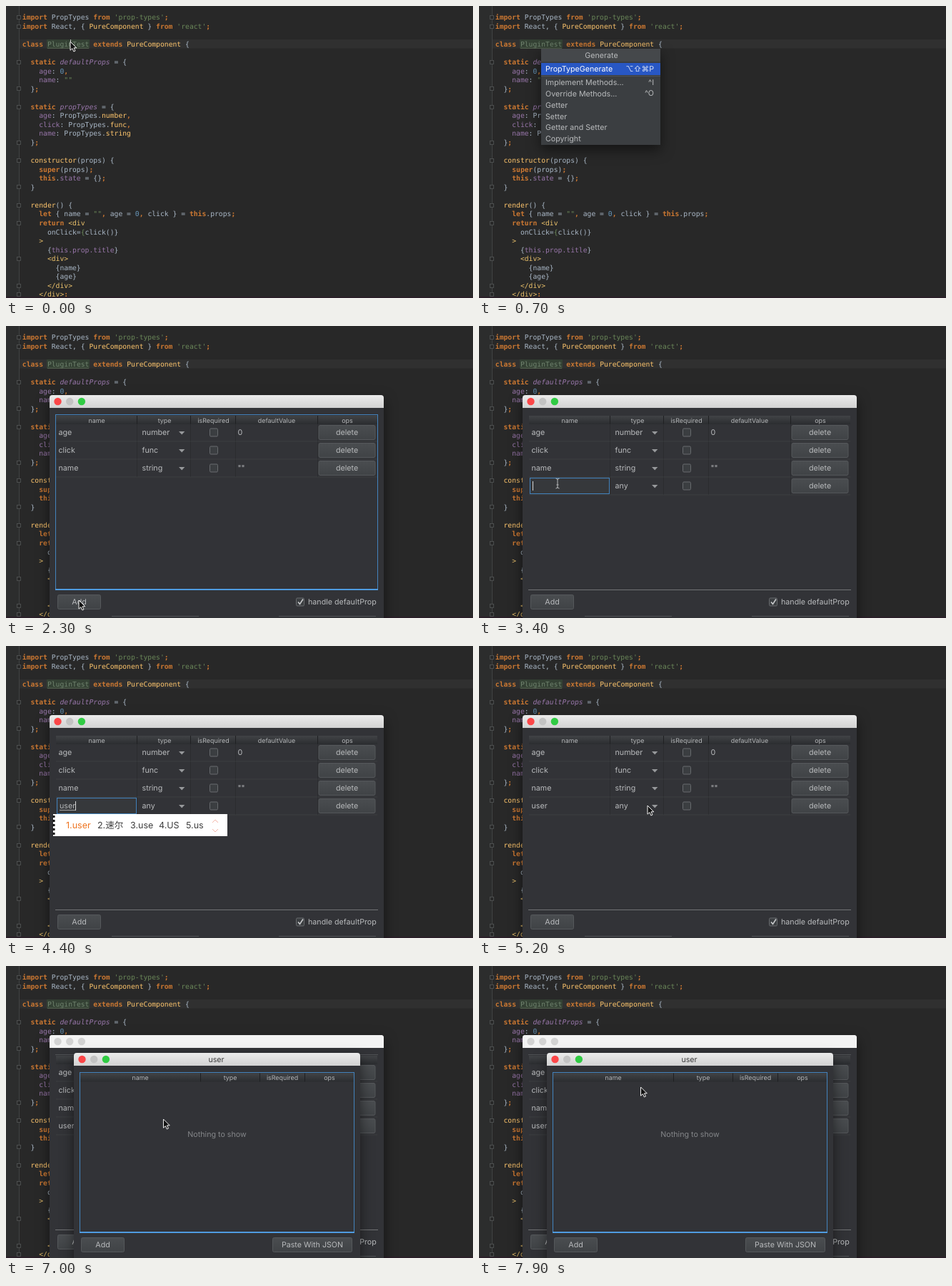
Write an HTML page that moves like this. It is 654 px wide and 410 px high and loops after 8000 ms.

```html
<!DOCTYPE html>
<html lang="en">
<head>
<meta charset="utf-8">
<title>Prop type generator</title>
<style>
html, body { margin: 0; width: 654px; height: 410px; overflow: hidden; background: #282828; }
svg { display: block; text-rendering: geometricPrecision; }
text { white-space: pre; font: 10.7px Inter, "Noto Sans CJK SC", "Noto Sans CJK", sans-serif; }
.code { font: 9.73px "DejaVu Sans Mono", monospace; }
.head { font-size: 8.9px; }
.ime { font-size: 12.5px; }
.window { filter: drop-shadow(0 7px 9px rgba(0, 0, 0, .5)); }
</style>
</head>
<body>
<svg id="stage" width="654" height="410" viewBox="0 0 654 410">
  <defs>
    <linearGradient id="bar" x2="0" y2="1"><stop stop-color="#ebebeb"/><stop offset="1" stop-color="#d2d2d2"/></linearGradient>
    <linearGradient id="headFill" x2="0" y2="1"><stop stop-color="#414346"/><stop offset="1" stop-color="#2b2d30"/></linearGradient>
    <linearGradient id="button" x2="0" y2="1"><stop stop-color="#4a4d50"/><stop offset="1" stop-color="#404346"/></linearGradient>
  </defs>
</svg>
<script>
const LOOP = 8000, STEP = 100;
const stage = document.getElementById('stage');
const BLUE = '#4383bd', INK = '#b9bbbd', BODY = '#323337';

function add(parent, tag, attrs = {}, content) {
  const el = document.createElementNS('http://www.w3.org/2000/svg', tag);
  for (const key in attrs) el.setAttribute(key, attrs[key]);
  if (content !== undefined) el.textContent = content;
  return parent.appendChild(el);
}
const group = (parent, attrs) => add(parent, 'g', attrs);
const box = (parent, x, y, width, height, fill, more) =>
  add(parent, 'rect', { x, y, width, height, fill, ...more });
const frame = (parent, x, y, w, h, stroke, more) =>
  box(parent, x + .5, y + .5, w - 1, h - 1, 'none', { stroke, ...more });
const path = (parent, d, more) => add(parent, 'path', { d, fill: 'none', ...more });
// y is the middle of the text line
const label = (parent, x, y, content, fill = INK, more) =>
  add(parent, 'text', { x, y: y + 3.8, fill, ...more }, content);
const centred = (parent, x, y, content, fill, more) =>
  label(parent, x, y, content, fill, { 'text-anchor': 'middle', ...more });

// Editor: [c...] marks a coloured run, c being a key of COLOURS
const COLOURS = { o: '#cc7832', y: '#ffc66d', p: '#9876aa', i: '#9876aa', g: '#6a8759', n: '#6897bb', c: '#71856f', t: '#e8bf6a' };
const CODE = `[oimport] PropTypes [ofrom] [g'prop-types'][o;]
[oimport] React, { [yPureComponent] } [ofrom] [g'react'][o;]

[oclass] [cPluginTest] [oextends] [yPureComponent] {

  [ostatic] [idefaultProps] = {
    [page]: [n0][o,]
    [pname]: [g""]
  }[o;]

  [ostatic] [ipropTypes] = {
    [page]: PropTypes.[ynumber][o,]
    [pclick]: PropTypes.[yfunc][o,]
    [pname]: PropTypes.[ystring]
  }[o;]

  [yconstructor](props) {
    [osuper](props)[o;]
    [othis].[pstate] = {}[o;]
  }

  [yrender]() {
    [olet] { name = [g""][o,] age = [n0][o,] click } = [othis].props[o;]
    [oreturn] [t<div]
      onClick=[g{]click()}
    [t>]
      {[pthis.prop.title]}
      [t<div>]
        {name}
        {age}
      [t</div>]
    [t</div>][o;]`;

function drawEditor() {
  box(stage, 0, 0, 654, 410, '#282828');
  box(stage, 0, 0, 18, 410, '#2c2d2d');
  box(stage, 18, 47, 636, 12.5, '#303030');
  box(stage, 57, 47, 60, 12.5, '#344134');
  path(stage, 'M18.5 0V410', { stroke: '#414343' });
  CODE.split('\n').forEach((line, row) => {
    const y = 16 + row * 12.55;
    const text = add(stage, 'text', { class: 'code', x: 22.8, y: y + 3.3, fill: '#a9b7c6' });
    for (const [run, key, words] of line.matchAll(/\[(\w)([^\]]*)\]|[^\[]+/g)) {
      const span = add(text, 'tspan', {}, key ? words : run);
      if (!key) continue;
      span.setAttribute('fill', COLOURS[key]);
      if (key === 'o') span.setAttribute('font-weight', 700);
      if (key === 'i') span.setAttribute('font-style', 'italic');
    }
  });
  path(stage, 'M58 59.2H116', { stroke: '#657860', 'stroke-width': .8 });
  for (const row of [0, 1, 5, 8, 10, 14, 16, 19, 21, 23, 27, 30, 31]) {
    const y = Math.round(16 + row * 12.55);
    box(stage, 15.5, y - 2.5, 5, 5, '#282828', { stroke: '#555757', 'stroke-width': .8 });
  }
  box(stage, 0, 408, 654, 2, '#2b2029');
}

function drawButton(parent, x, y, w, h, name) {
  box(parent, x + .5, y + .5, w - 1, h - 1, 'url(#button)', { rx: 2, stroke: '#55585b' });
  centred(parent, x + w / 2, y + h / 2, name);
}

function drawLights(parent, x, y, colours) {
  colours.forEach((fill, i) => add(parent, 'circle', { cx: x + i * 16.7, cy: y, r: 5.2, fill }));
}
const LIGHTS = ['#fb4648', '#c3c3c3', '#30cb43'];

function drawWindow(x, y, w) {
  const win = group(stage, { class: 'window' });
  box(win, x, y, w, 340, BODY, { rx: 4 });
  path(win, `M${x} ${y + 18}v-14q0-4 4-4h${w - 8}q4 0 4 4v14z`, { fill: 'url(#bar)' });
  drawLights(win, x + 11.5, y + 9, LIGHTS);
  return win;
}

function drawHeader(parent, x, y, w, names, lines) {
  box(parent, x, y, w, 12, 'url(#headFill)');
  for (const [cx, name] of names) centred(parent, cx, y + 6, name, '#b4b6b8', { class: 'head' });
  for (const lx of lines) path(parent, `M${lx}.5 ${y}v12`, { stroke: '#1f2022' });
}

function drawCheck(parent, x, y, on) {
  box(parent, x + .5, y + .5, 11, 11, '#3b3e41', { rx: 1.5, stroke: '#686b6e' });
  if (on) path(parent, `M${x + 3} ${y + 6}l2.5 3l4.5 -7`, { stroke: '#c8cacc', 'stroke-width': 1.6 });
}

function drawRow(parent, index, name, type, value) {
  const y = 149.5 + index * 25, row = group(parent);
  path(row, `M70 ${y + 12.5}H520`, { stroke: '#3d3e41' });
  for (const x of [183.5, 258.5, 321.5, 436.5]) path(row, `M${x} ${y - 12}v24`, { stroke: '#2b2c2f' });
  row.name = label(row, 73.5, y, name);
  row.type = label(row, 190.5, y, type);
  path(row, `M242 ${y - 1.5}h8.4l-4.2 4.6z`, { fill: '#97999b' });
  drawCheck(row, 285, y - 6, false);
  label(row, 324.5, y, value);
  drawButton(row, 437.5, y - 10.5, 80, 21, 'delete');
  return row;
}

function drawMenu() {
  const menu = group(stage, { class: 'window' });
  box(menu, 87, 60, 167, 135, '#3b3e41');
  box(menu, 87, 60, 167, 18, '#45484b');
  centred(menu, 171.5, 69, 'Generate');
  box(menu, 87, 80, 167, 17, '#2857c4');
  label(menu, 93, 88.5, 'PropTypeGenerate', '#fff', { 'font-weight': 500 });
  label(menu, 245, 88.5, '⌥⇧⌘P', '#dbe3f5', { 'text-anchor': 'end' });
  path(menu, 'M87 98.5H254', { stroke: '#505356' });
  ['Implement Methods...', 'Override Methods...', 'Getter', 'Setter', 'Getter and Setter', 'Copyright']
    .forEach((name, i) => label(menu, 93, 107 + i * 15.9, name));
  label(menu, 245, 107, '^I', INK, { 'text-anchor': 'end' });
  label(menu, 245, 122.5, '^O', INK, { 'text-anchor': 'end' });
  return menu;
}

function drawDropdown() {
  const list = group(stage);
  box(list, 183.5, 236.5, 75, 152, '#38393c', { stroke: '#0c0c0d' });
  box(list, 185, 268, 61, 15, '#2c57cb');
  'any string object bool func number array symbol node exact'.split(' ')
    .forEach((name, i) => label(list, 186, 245.8 + i * 15.05, name, i === 2 ? '#fff' : INK));
  box(list, 248, 240, 8.5, 84, '#515356', { rx: 3 });
  return list;
}

function drawCandidates() {
  const bar = group(stage);
  box(bar, 66, 236, 244, 31, '#fff');
  path(bar, 'M67 238V267', { stroke: '#111', 'stroke-width': 3, 'stroke-dasharray': '3 3' });
  [[84, '1.user'], [128, '2.速尔'], [174, '3.use'], [214, '4.US'], [252, '5.us']]
    .forEach(([x, word], i) => label(bar, x, 252.5, word, i ? '#3d3d3d' : '#ee7420', { class: 'ime' }));
  path(bar, 'M289 248l4-4l4 4M289 257l4 4l4-4', { stroke: '#f3b5a8' });
  return bar;
}

drawEditor();
const editorCaret = path(stage, 'M90.5 47V59.5', { stroke: '#c8c8c8' });
const menu = drawMenu();

const main = drawWindow(61, 97, 468);
drawHeader(main, 70, 126, 450, [[127, 'name'], [222, 'type'], [290.5, 'isRequired'], [379, 'defaultValue'], [478, 'ops']], [183, 258, 321, 436]);
drawRow(main, 0, 'age', 'number', '0');
drawRow(main, 1, 'click', 'func', '');
drawRow(main, 2, 'name', 'string', '""');
const newRow = drawRow(main, 3, '', 'any', '');
path(main, 'M69 370.5H521', { stroke: '#717375' });
const focusRing = group(main);
frame(focusRing, 69, 124, 452, 247, BLUE);
path(focusRing, 'M69 370H521', { stroke: '#4f9be0', 'stroke-width': 2 });
const editBox = group(main);
box(editBox, 71.5, 213.5, 111, 22, '#36383b', { stroke: BLUE });
const typed = label(editBox, 75, 224.5, '');
const underline = path(editBox, '', { stroke: '#a5a7a9' });
const caret = path(editBox, '', { stroke: '#d4d4d4' });
const typeRing = frame(main, 184, 213, 74, 24, BLUE);
drawButton(main, 72, 377, 61, 21, 'Add');
drawCheck(main, 406, 381.5, true);
label(main, 423, 387.5, 'handle defaultProp');
path(main, 'M148 407.5H270M382 407.5H518', { stroke: '#505356' });
const inactive = group(main);
path(inactive, 'M61 115v-14q0-4 4-4h460q4 0 4 4v14z', { fill: '#f3f3f3' });
drawLights(inactive, 72.5, 106, Array(3).fill('#d3d3d3'));
path(inactive, 'M69 124.5H521', { stroke: '#505255' });

const candidates = drawCandidates();
const dropdown = drawDropdown();

const child = drawWindow(95, 122, 401);
centred(child, 294.5, 131.5, 'user', '#3c3c3c');
drawHeader(child, 104, 150.5, 383, [[188, 'name'], [314, 'type'], [387, 'isRequired'], [453, 'ops']], [272, 355, 418]);
frame(child, 103, 149, 385, 226, BLUE);
path(child, 'M103 374H488', { stroke: '#4f9be0', 'stroke-width': 2 });
centred(child, 295.5, 236, 'Nothing to show', '#85878a');
drawButton(child, 105, 381, 61, 21, 'Add');
drawButton(child, 373, 381, 112, 21, 'Paste With JSON');

const arrow = path(stage, 'M0 0V12.2L2.9 9.6L4.9 14L7 13L5 8.8H8.8Z', { fill: '#111', stroke: '#f2f2f2' });
const beam = path(stage, 'M-2.5-7Q0-7 0-5Q0-7 2.5-7M0-5V5M-2.5 7Q0 7 0 5Q0 7 2.5 7M-1.5 2H1.5', { stroke: '#b8babc' });

// Pointer path: time, x, y
const MOVES = [[0, 90, 50], [1400, 160, 250], [2100, 102, 385], [2600, 102, 385], [3200, 110, 221],
  [4700, 110, 221], [5200, 236, 224], [5400, 236, 224], [5800, 212, 278], [6500, 212, 278], [7400, 226.5, 170]];

// Intervals in which each part is visible
const SHOWN = [
  [editorCaret, 0, 300],
  [menu, 300, 1000],
  [main, 1000, LOOP],
  [focusRing, 1000, 3200],
  [newRow, 2500, LOOP],
  [editBox, 3200, 5200],
  [candidates, 3800, 4700],
  [typeRing, 5300, 6900],
  [dropdown, 5300, 6400],
  [inactive, 6900, LOOP],
  [child, 6900, LOOP],
  [arrow, 0, 400, 1400, 3100, 4900, LOOP],
  [beam, 3100, 3700, 4700, 4900],
];

function pointerAt(t) {
  const next = MOVES.findIndex(move => move[0] > t);
  if (next < 0) return MOVES.at(-1).slice(1);
  const [t0, x0, y0] = MOVES[next - 1], [t1, x1, y1] = MOVES[next];
  const k = (t - t0) / (t1 - t0), ease = k * k * (3 - 2 * k);
  return [x0 + (x1 - x0) * ease, y0 + (y1 - y0) * ease];
}

function render(t) {
  for (const [el, ...spans] of SHOWN) {
    const on = spans.some((from, i) => i % 2 === 0 && t >= from && t < spans[i + 1]);
    el.style.display = on ? '' : 'none';
  }
  const count = Math.max(0, Math.min(4, Math.floor((t - 3800) / 150) + 1));
  typed.textContent = 'user'.slice(0, count);
  const end = 75 + (count ? typed.getComputedTextLength() : 0);
  underline.setAttribute('d', count && t < 4700 ? `M75 230.5H${end}` : '');
  caret.setAttribute('d', `M${Math.round(end) + .5} 218V231`);
  newRow.name.textContent = t >= 5200 ? 'user' : '';
  newRow.type.textContent = t >= 6400 ? 'object' : 'any';
  const place = `translate(${pointerAt(t).join(' ')})`;
  arrow.setAttribute('transform', place);
  beam.setAttribute('transform', place);
}

const start = performance.now();
function tick() {
  const t = (performance.now() - start) % LOOP;
  render(Math.floor(t / STEP) * STEP);
  requestAnimationFrame(tick);
}
tick();
</script>
</body>
</html>
```
